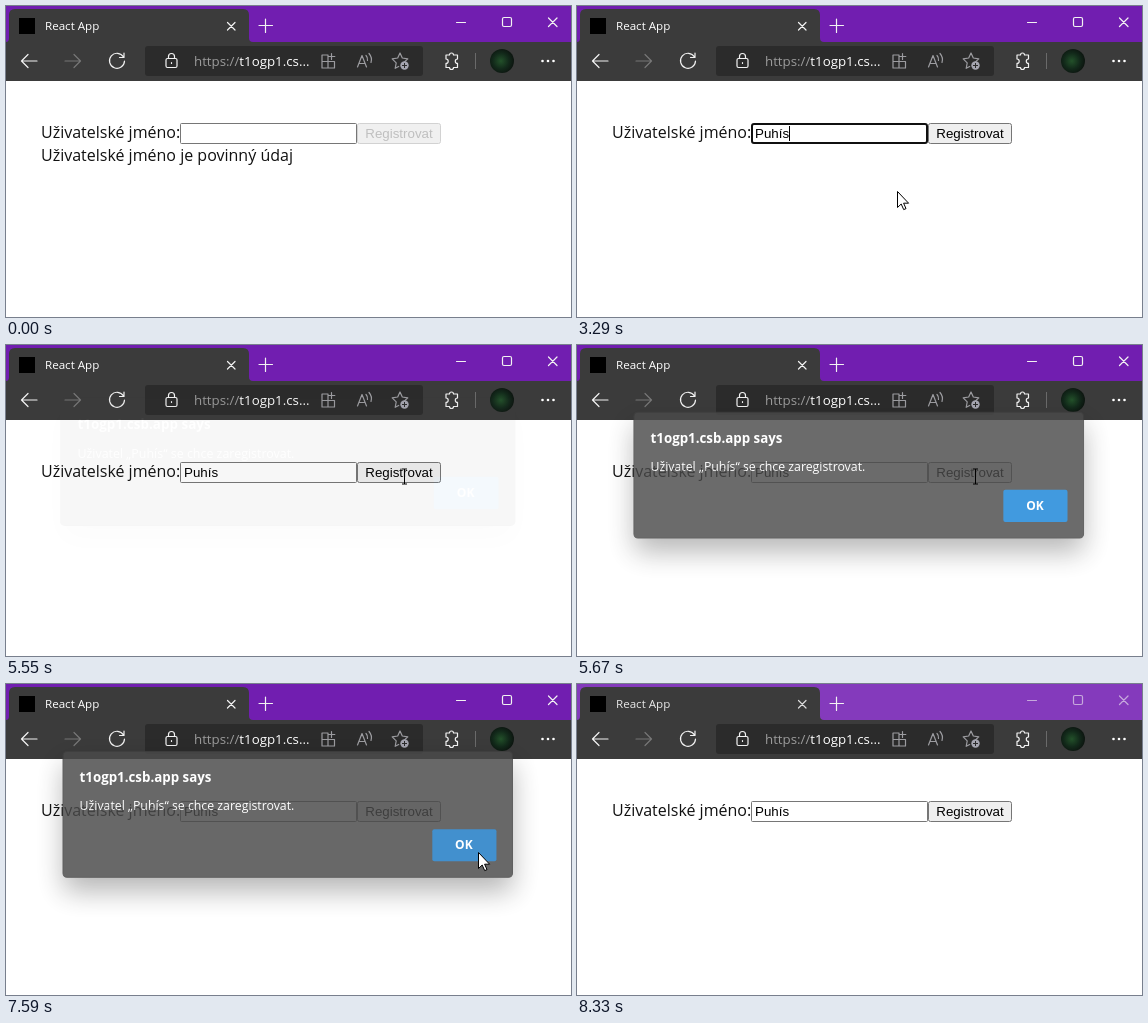
Recreate the animation shown at these times as an HTML page. Size 565 px wide and 311 px high, loop 8.4 s.

```html
<!DOCTYPE html>
<html lang="cs">
<head>
<meta charset="utf-8">
<title>React App</title>
<style>
  html, body { margin: 0; width: 100%; height: 100%; overflow: hidden; background: #fff; }
  svg { display: block; width: 565px; height: 311px; }
  text { font-family: "Open Sans", "Noto Sans", sans-serif; white-space: pre; }
  .form { font: 13.333px "Liberation Sans", Arial, sans-serif; }
  .page { font-size: 16px; fill: #111; }
  .line { fill: none; stroke: #f2f2f2; stroke-width: 1.2; stroke-linecap: round; stroke-linejoin: round; }
  .dim { stroke: #9c9ca0; }
</style>
</head>
<body>
<svg viewBox="0 0 565 311" xmlns="http://www.w3.org/2000/svg">
  <defs>
    <filter id="blur" filterUnits="userSpaceOnUse" x="-20" y="0" width="605" height="311">
      <feGaussianBlur stdDeviation="14"/>
    </filter>
    <radialGradient id="photo" cx=".45" cy=".5" r=".6">
      <stop offset="0" stop-color="#23512a"/>
      <stop offset=".55" stop-color="#12291a"/>
      <stop offset="1" stop-color="#0b100d"/>
    </radialGradient>
  </defs>
  <rect width="565" height="311" fill="#fff"/>

  <!-- page -->
  <text class="page" x="35" y="132">Uživatelské jméno:</text>
  <text class="page" id="error" x="35" y="155">Uživatelské jméno je povinný údaj</text>
  <rect id="field" fill="#fff"/>
  <text class="form" id="typed" x="178" y="132" fill="#000"></text>
  <rect id="caret" y="120" width="1" height="15" fill="#000"/>
  <rect id="button" x="351.5" y="117.5" width="83" height="20" rx="2"/>
  <text class="form" id="label" x="393" y="132" text-anchor="middle">Registrovat</text>

  <!-- window frame -->
  <rect id="bar" width="565" height="37"/>
  <path d="M0 36Q3 36 3 32V9Q3 3 9 3H237Q243 3 243 9V32Q243 36 247 36H565V75H0Z" fill="#3b3b3b"/>
  <rect x="13" y="12" width="16" height="16" fill="#000"/>
  <g id="tab">
    <text x="39" y="24" font-size="11.6" fill="#fff">React App</text>
    <path class="line" d="M221.5 16.5l7.5 7.5m0-7.5l-7.5 7.5"/>
  </g>
  <path class="line" d="M253 19.5h13.5M259.5 13v13.5"/>
  <g id="controls" class="line" stroke-width="1">
    <path d="M450.5 16.5h9M542.5 12l8.5 8.5m0-8.5l-8.5 8.5"/>
    <rect x="496.5" y="11.5" width="9" height="9" rx="1.5"/>
  </g>

  <!-- toolbar -->
  <path class="line" d="M31 55H15.5M22 48.5L15.5 55l6.5 6.5"/>
  <path class="line" style="stroke:#777" d="M59 55h15.5M68 48.5l6.500 6.500l-6.500 6.500"/>
  <path class="line" d="M117.500 51A7.500 7.500 0 1 0 118.500 55M118 47v4.500h-4.500"/>
  <rect x="139" y="40" width="278" height="30" rx="3" fill="#2b2b2b"/>
  <g class="line">
    <rect x="160" y="52.500" width="11" height="9" rx="1.500"/>
    <path d="M162.500 52.500v-2a3 3 0 0 1 6 0v2M165.500 56.500v1"/>
  </g>
  <text x="188" y="60" font-size="13.300" fill="#9b9b9b">https://<tspan fill="#fff">t1ogp1.cs...</tspan></text>
  <g class="line dim">
    <path d="M316 49h6v13h-6zM316 55.500h12.500v6.500h-6.500M325.500 47.500v6M322.800 50.500h6"/>
    <path d="M351.500 61l4.500-11.500l4.500 11.500M353 57.500h6M360 49.500q2 2 1.500 5M363 47.500q3.500 4 2 9"/>
    <path d="M394 47l2.300 5l5.500.8l-3 2.800M394 47l-2.300 5l-5.500.8l4 4l-1 5.500l3.500-1.800"/>
  </g>
  <circle cx="398.500" cy="59.500" r="4.200" fill="#a5a5b0"/>
  <path d="M396 59.500h5M398.500 57v5" stroke="#2b2b2b"/>
  <path class="line" d="M440 49h3.500a2 2 0 0 1 4 0h4v4a2.200 2.200 0 0 0 0 4.400v4.100h-4a2 2 0 0 1-4 0h-3.500v-4.100a2.200 2.200 0 0 0 0-4.400z"/>
  <path d="M469.500 47v16" stroke="#6a6a6a"/>
  <circle cx="496" cy="55" r="12" fill="url(#photo)"/>
  <g fill="#fff"><circle cx="536.500" cy="55" r="1.300"/><circle cx="542" cy="55" r="1.300"/><circle cx="547.500" cy="55" r="1.300"/></g>

  <!-- alert -->
  <g id="dialog">
    <rect x="58" y="84" width="448" height="126" fill="#000" opacity=".35" filter="url(#blur)"/>
    <rect x="57.500" y="70.500" width="448.500" height="125.500" rx="4" fill="#4a4a4a" stroke="#404040"/>
    <text x="74" y="101" font-size="13.300" font-weight="700" fill="#fff">t1ogp1.csb.app says</text>
    <text x="74" y="129" font-size="12.300" fill="#fff" id="message"></text>
    <rect id="ok" x="426" y="148" width="64" height="32" rx="2"/>
    <text x="457.500" y="168" font-size="12" font-weight="700" fill="#fff" text-anchor="middle">OK</text>
  </g>

  <path id="arrow" d="M.5.5V16.500L4.200 13L6.700 18.600L9 17.600L6.600 12.200H11.600Z" fill="#fff" stroke="#000"/>
  <path id="beam" d="M-2.500-7.500H2.500M0-7.500V7.500M-2.500 7.500H2.500" fill="none" stroke="#000"/>
</svg>
<script>
const LOOP = 8400, BLINK = 530;
const NAME = "Puhís";
const KEYS = [2280, 2610, 2890, 3060, 3290];
const FOCUS = 1120, PRESS = 5370;
const CARET_X = [178, 186, 194, 201, 205, 212];

// start, end, from, to
const MOVES = [
  [230, 760, [480, 308], [302, 128]],
  [1370, 1640, [302, 128], [320, 185]],
  [4290, 5070, [320, 185], [398, 131]],
  [6160, 6790, [398, 131], [472, 168]],
  [7740, 7950, [472, 168], [488, 290]]
];

const el = {};
document.querySelectorAll("[id]").forEach(n => el[n.id] = n);
el.message.textContent = `Uživatel „${NAME}“ se chce zaregistrovat.`;

const set = (node, attrs) => {
  for (const k in attrs) node.setAttribute(k, attrs[k]);
};
const show = (node, on) => set(node, { visibility: on ? "visible" : "hidden" });
const during = (t, a, b) => t >= a && t < b;
const ramp = (t, a, b) => Math.min(1, Math.max(0, (t - a) / (b - a)));
const ease = p => 1 - (1 - p) ** 2 * (1 + 2 * p) * (1 - .3 * p);

function pointer(t) {
  let pos = MOVES[0][2];
  for (const [a, b, from, to] of MOVES) {
    if (t < a) break;
    const p = ease(ramp(t, a, b));
    pos = from.map((v, i) => v + (to[i] - v) * p);
  }
  return pos;
}

function drawFrame(t) {
  const active = t < 230 || during(t, FOCUS, 8330);
  el.bar.setAttribute("fill", active ? "#711eb0" : "#843abc");
  el.controls.setAttribute("opacity", active ? 1 : .6);
  el.tab.setAttribute("opacity", active ? 1 : .88);
}

function drawField(t) {
  const focused = during(t, FOCUS, PRESS);
  const count = KEYS.filter(k => t >= k).length;
  const last = count ? KEYS[count - 1] : FOCUS;
  set(el.field, focused
    ? { x: 175, y: 118, width: 175, height: 19, rx: 2, stroke: "#101010", "stroke-width": 2 }
    : { x: 174.5, y: 117.5, width: 176, height: 20, rx: 1, stroke: "#767676", "stroke-width": 1 });
  el.typed.textContent = NAME.slice(0, count);
  el.caret.setAttribute("x", CARET_X[count]);
  show(el.caret, focused && (t - last) % (2 * BLINK) < BLINK);
  show(el.error, !count);
  return count > 0;
}

function drawButton(t, enabled, over) {
  let look = ["#efefef", "#767676", "#000"];
  if (!enabled) look = ["#f0f0f0", "#d2d2d2", "#bfbfbf"];
  else if (during(t, PRESS, 5470)) look = ["#f5f5f5", "#8d8d8d", "#000"];
  else if (over && t < PRESS) look = ["#e5e5e5", "#4f4f4f", "#000"];
  set(el.button, { fill: look[0], stroke: look[1] });
  el.label.setAttribute("fill", look[2]);
}

function drawDialog(t, x, y) {
  const open = ramp(t, 5545, 5700) - ramp(t, 7565, 7720);
  const away = 1 - open, scale = 1 + .013 * away;
  show(el.dialog, open > 0);
  set(el.dialog, {
    opacity: open,
    transform: `translate(282 ${133 - 17 * away}) scale(${scale}) translate(-282 -133)`
  });
  const over = x > 426 && y > 148;
  el.ok.setAttribute("fill", during(t, 7430, 7530) ? "#1a70b5" : over ? "#1c7ac5" : "#1683d8");
}

function draw(t) {
  const [x, y] = pointer(t);
  const overButton = x > 351 && x < 435 && y > 117 && y < 138;
  const overField = x > 174 && x <= 351 && y > 117 && y < 138;
  const beam = (overButton || overField) && t < 6190;
  const visible = during(t, 230, 7950);
  drawFrame(t);
  drawButton(t, drawField(t), overButton);
  drawDialog(t, x, y);
  show(el.arrow, visible && !beam);
  show(el.beam, visible && beam);
  const place = `translate(${Math.round(x)} ${Math.round(y)})`;
  el.arrow.setAttribute("transform", place);
  el.beam.setAttribute("transform", `${place} translate(.5 .5)`);
}

const start = performance.now();
function tick() {
  draw((performance.now() - start) % LOOP);
  requestAnimationFrame(tick);
}
tick();
</script>
</body>
</html>
```
